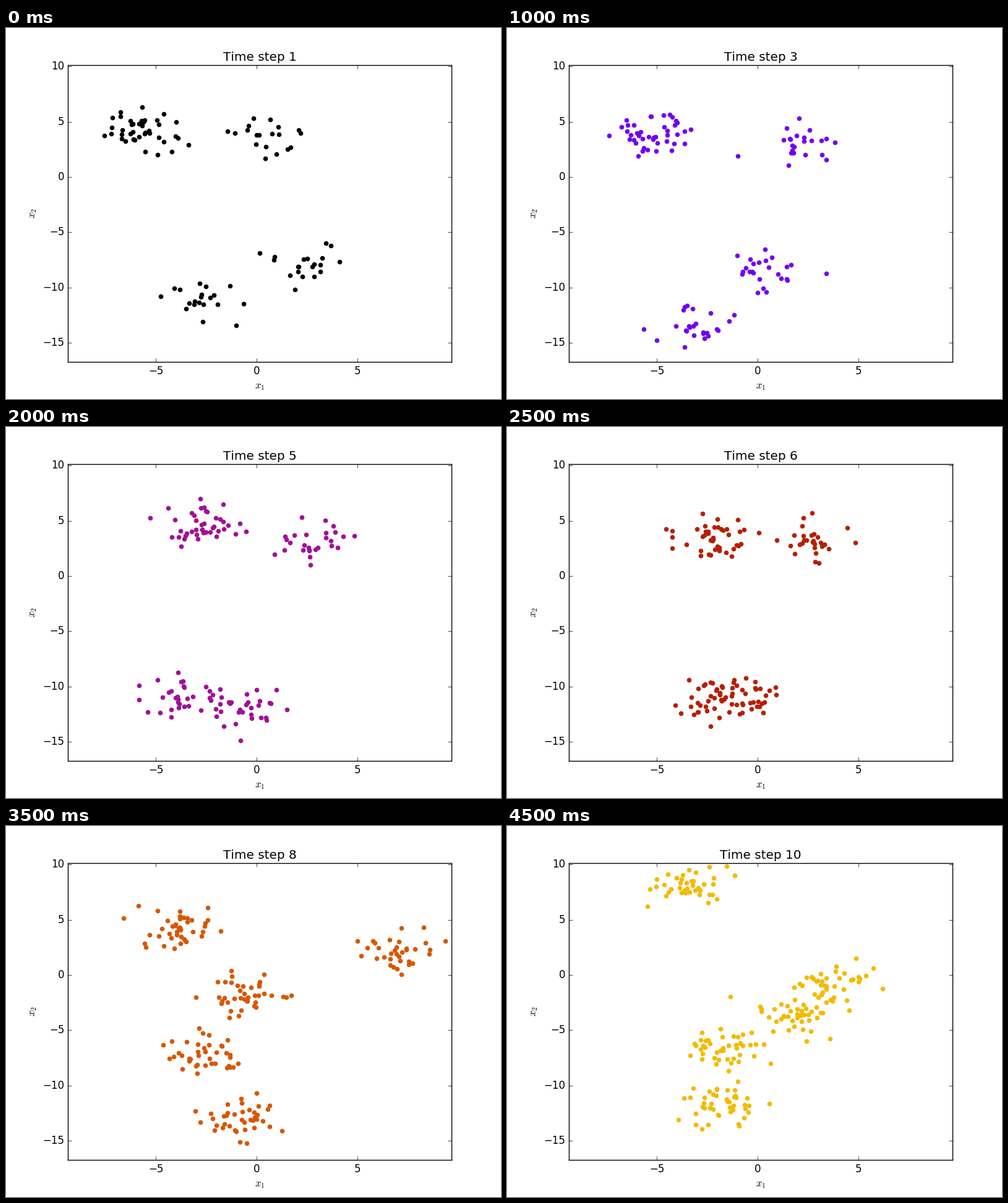
Animation of 800x600 px, one loop 5 s. Source, as a matplotlib script:

```python
import numpy as np
import matplotlib.pyplot as plt
from matplotlib.animation import FuncAnimation

STEPS = 10
STEP_MS = 500
SPREAD = 0.97

plt.style.use("classic")
plt.rcParams["font.family"] = "DejaVu Sans"
plt.rcParams["text.kerning_factor"] = 6

# Each cluster's centre wanders through these points at the key steps
KEY_STEPS = [1, 3, 5, 6, 7, 8, 9, 10]
PATHS = {
    "upper left": [(-5.7, 4.2), (-5.2, 3.9), (-2.7, 4.6), (-2.2, 3.4),
                   (-1.9, 2.4), (-3.9, 4.2), (-4.5, 7.8), (-3.4, 8.2)],
    "upper right": [(0.5, 3.7), (2.1, 3.0), (2.8, 3.1), (2.6, 3.2),
                    (5.8, 3.4), (7.0, 2.1), (6.2, -1.1), (3.8, -0.8)],
    "lower right": [(2.4, -7.9), (0.4, -8.5), (-0.6, -12.0), (-0.7, -10.9),
                    (-0.7, -10.0), (-0.8, -13.0), (-1.2, -12.2), (-1.8, -11.8)],
    "lower left": [(-2.7, -11.1), (-3.1, -13.5), (-3.8, -10.9), (-2.2, -11.2),
                   (-1.6, -10.9), (-2.6, -7.2), (-1.3, -6.7), (-1.6, -6.7)],
    "centre": [(0.2, -1.8), (-0.6, -1.8), (0.2, -3.7), (1.8, -3.6)],
}
# Number of points at the first and last step
SIZES = {
    "upper left": (42, 42),
    "upper right": (19, 38),
    "lower right": (20, 44),
    "lower left": (20, 44),
    "centre": (32, 42),
}


def cluster(name, step, rng):
    path = np.array(PATHS[name])
    keys = KEY_STEPS[-len(path):]
    if step < keys[0]:
        return np.empty((0, 2))
    centre = [np.interp(step, keys, axis) for axis in path.T]
    size = round(np.interp(step, (1, STEPS), SIZES[name]))
    noise = rng.normal(size=(size, 2))
    return centre + SPREAD * (noise - noise.mean(axis=0)) / noise.std(axis=0)


def cloud(step):
    rng = np.random.RandomState(step)
    return np.vstack([cluster(name, step, rng) for name in PATHS])


fig = plt.figure(figsize=(8, 6), dpi=100, facecolor="white")
ax = fig.add_axes([0.125, 0.1, 0.775, 0.8])
dots = ax.scatter([], [], s=20, linewidths=1.0)
ax.set_xlim(-9.3536, 9.659)
ax.set_ylim(-16.732, 10.129)
ax.set_xticks(range(-5, 6, 5))
ax.set_yticks(range(-15, 11, 5))
ax.set_xlabel("$x_1$")
ax.set_ylabel("$x_2$")
title = ax.set_title("Time step 1")


def draw(frame):
    step = frame + 1
    color = plt.cm.gnuplot(frame / STEPS)
    dots.set_offsets(cloud(step))
    dots.set_facecolor(color)
    dots.set_edgecolor(color)
    title.set_text(f"Time step {step}")
    return dots, title


anim = FuncAnimation(fig, draw, frames=STEPS, interval=STEP_MS,
                     repeat=True, repeat_delay=0, blit=False)
plt.show()
```
